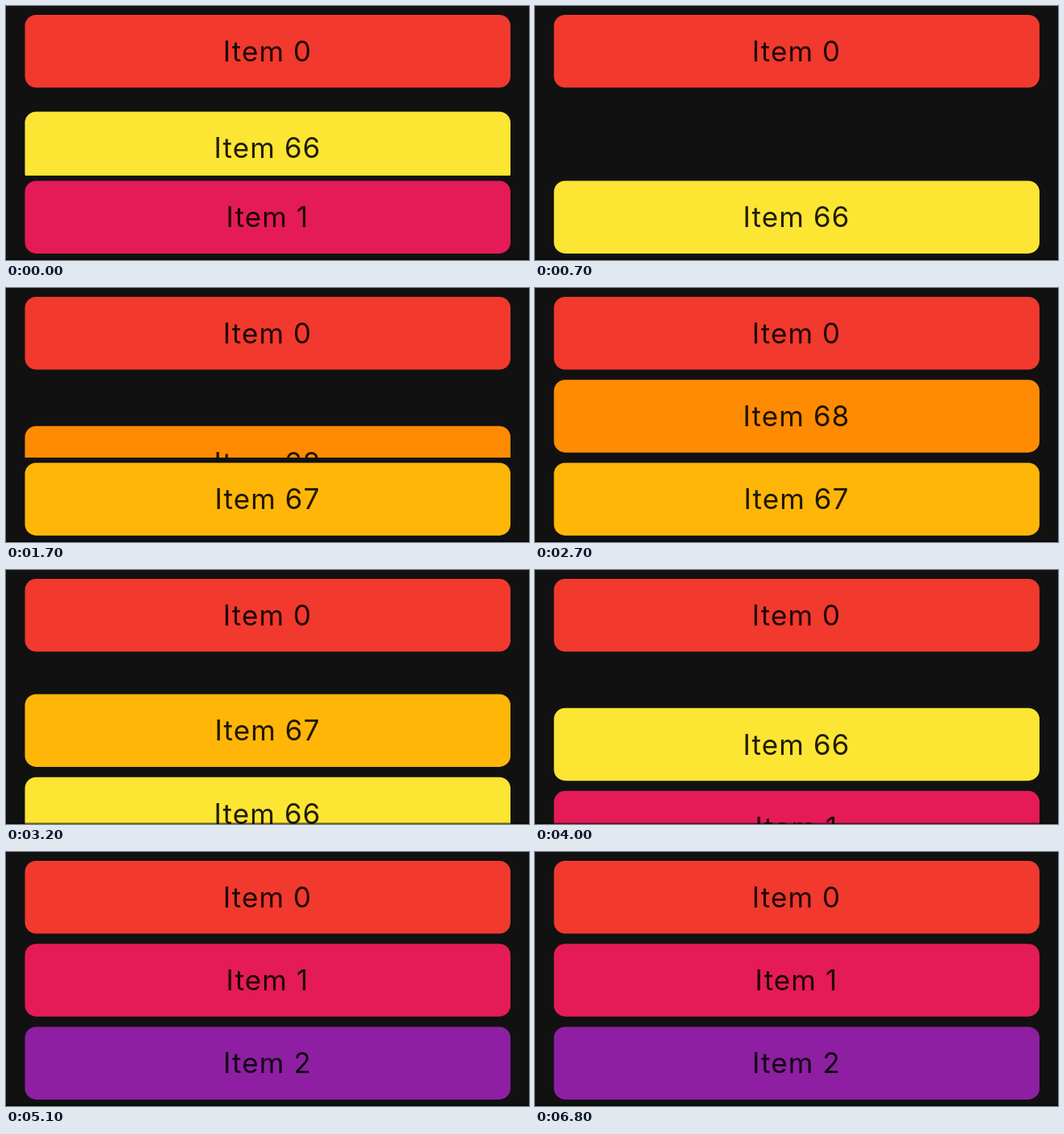
Recreate the animation shown at these times as an HTML page with a canvas. Size 650 by 316 pixels, loop 6.9 s.

```html
<!DOCTYPE html>
<html lang="en">
<head>
<meta charset="utf-8">
<title>Animated list</title>
<style>
  html, body { margin: 0; width: 100%; height: 100%; overflow: hidden; background: #111; }
  canvas { display: block; }
</style>
</head>
<body>
<canvas width="650" height="316"></canvas>
<script>
const ctx = document.querySelector('canvas').getContext('2d');
const LOOP = 6900, STEP = 100, PHASE = 300;
const LEFT = 23.5, TOP = 11, WIDTH = 603.5, HEIGHT = 90.5, PITCH = 103.2, GAP = PITCH - HEIGHT;

// Items with open/close times come and go; the others always stay.
const items = [
  { id: 0, color: '#f1392e' },
  { id: 68, color: '#ff8b02', open: 1267, close: 2717 },
  { id: 67, color: '#ffb608', open: 390, close: 3567 },
  { id: 66, color: '#fde534', open: -550, close: 4417 },
  { id: 1, color: '#e41b56' },
  { id: 2, color: '#8e1fa2' },
];

const ramp = (t, start) => Math.min(1, Math.max(0, (t - start) / PHASE));

// The slot grows first, then the card slides up into it; closing runs in reverse.
function stateAt({ open, close }, t) {
  if (open === undefined) return { grow: 1, slide: 1 };
  return {
    grow: ramp(t, open) - ramp(t, close + PHASE),
    slide: ramp(t, open + PHASE) - ramp(t, close),
  };
}

function drawCard({ id, color }, y, slide) {
  const top = y + (1 - slide) * PITCH;
  ctx.save();
  ctx.beginPath();
  ctx.rect(0, y - GAP / 2, 650, PITCH);
  ctx.clip();
  ctx.fillStyle = color;
  ctx.beginPath();
  ctx.roundRect(LEFT, top, WIDTH, HEIGHT, 14);
  ctx.fill();
  ctx.fillStyle = 'rgba(0, 0, 0, .87)';
  ctx.fillText('Item ' + id, 325, top + HEIGHT / 2 + 12.7);
  ctx.restore();
}

function draw() {
  const t = Math.floor(performance.now() % LOOP / STEP) * STEP;
  ctx.fillStyle = '#111';
  ctx.fillRect(0, 0, 650, 316);
  ctx.font = '35px Inter, Roboto, sans-serif';
  ctx.letterSpacing = '1.1px';
  ctx.textAlign = 'center';
  let y = TOP;
  for (const item of items) {
    const { grow, slide } = stateAt(item, t);
    if (slide > 0) drawCard(item, y, slide);
    y += grow * PITCH;
  }
  ctx.fillStyle = 'rgba(0, 0, 0, .6)';
  ctx.fillRect(0, 314.5, 650, 1.5);
  requestAnimationFrame(draw);
}
draw();
</script>
</body>
</html>
```
